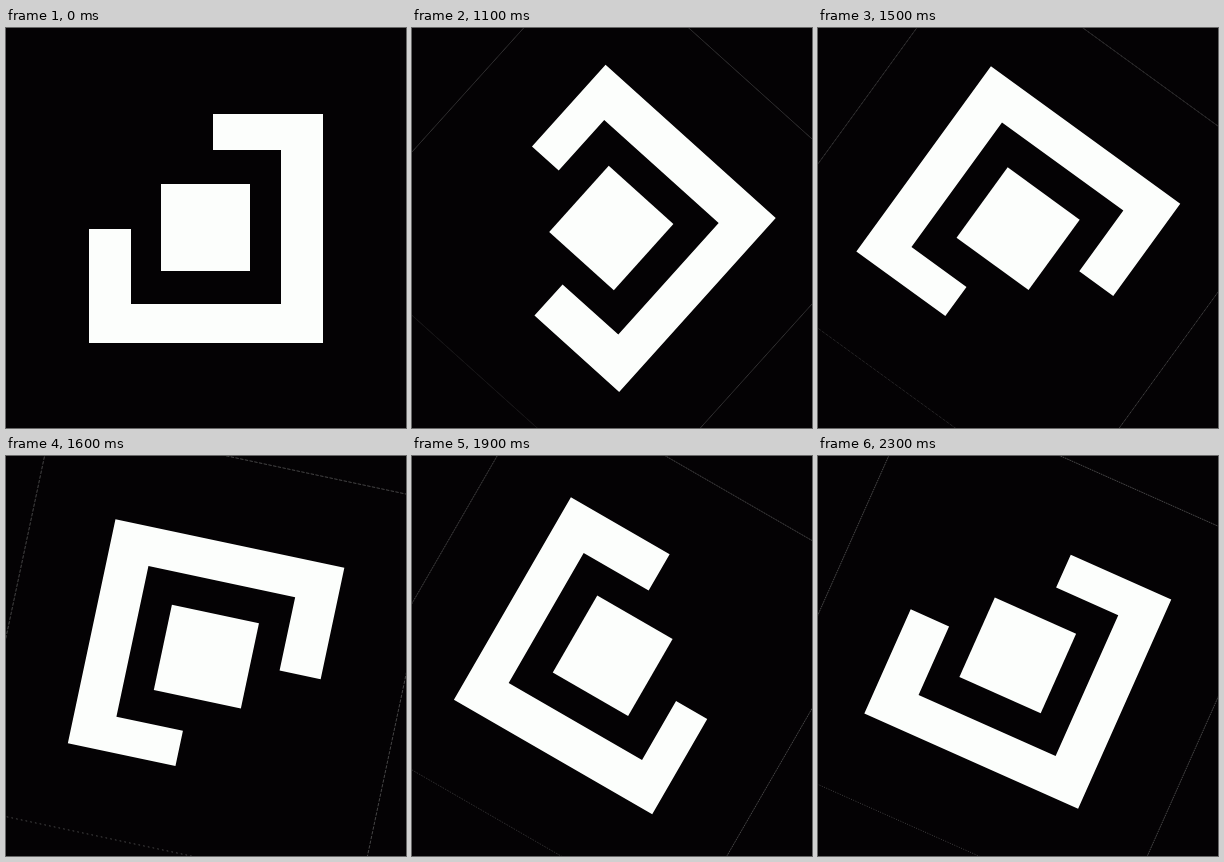
Animation of 400 by 400 pixels, one loop 2.4 s. Source, as an HTML page with a canvas:

```html
<!DOCTYPE html>
<html lang="en">
<head>
<meta charset="utf-8">
<title>Rotating mark</title>
<style>
  html, body { margin: 0; width: 100%; height: 100%; overflow: hidden; background: #040204; }
  canvas { display: block; width: 400px; height: 400px; }
</style>
</head>
<body>
<canvas id="stage" width="400" height="400"></canvas>
<script>
const ctx = document.getElementById('stage').getContext('2d');
const DARK = '#040204', LIGHT = '#fcfefc';
const HOLD = 1000, STEP = 100, STEPS = 15;
const TURN = 360 / STEPS;
const LOOP = HOLD + (STEPS - 1) * STEP;

// Corners of the open bracket, relative to the stage centre
const BRACKET = [
  [7, -114], [117, -114], [117, 115], [-117, 115], [-117, 1],
  [-75, 1], [-75, 76], [75, 76], [75, -78], [7, -78]
];

const rad = deg => deg * Math.PI / 180;

function stepAt(ms) {
  const t = ms % LOOP;
  return t < HOLD ? 0 : 1 + Math.floor((t - HOLD) / STEP);
}

function drawMark(deg) {
  ctx.save();
  ctx.rotate(rad(-deg));
  ctx.fillStyle = LIGHT;
  ctx.beginPath();
  BRACKET.forEach(([x, y]) => ctx.lineTo(x, y));
  ctx.closePath();
  ctx.fill();
  ctx.fillRect(-45, -44, 89, 87);
  ctx.restore();
}

function edge(x1, y1, x2, y2, period, fill, width) {
  ctx.setLineDash([period * fill, period * (1 - fill)]);
  ctx.lineWidth = width;
  ctx.beginPath();
  ctx.moveTo(x1, y1);
  ctx.lineTo(x2, y2);
  ctx.stroke();
}

// Faint broken outline of the turning sheet; its dashes follow the tilt
function drawSheet(deg) {
  const tilt = (deg + 45) % 90 - 45;
  const period = 1 / Math.abs(Math.sin(rad(tilt)));
  ctx.save();
  ctx.rotate(rad(-tilt));
  ctx.strokeStyle = '#686868';
  edge(-200, -200, 200, -200, period, 0.7, 0.6);
  edge(-199.5, -200, -199.5, 200, period, 0.7, 0.6);
  edge(199.5, -200, 199.5, 200, period, 0.7, 0.6);
  edge(-200, 198.7, 200, 198.7, period, 0.35, 0.6);
  ctx.restore();
}

function draw(step) {
  const deg = step * TURN;
  ctx.setTransform(1, 0, 0, 1, 0, 0);
  ctx.fillStyle = DARK;
  ctx.fillRect(0, 0, 400, 400);
  ctx.translate(200, 200);
  if (step) drawSheet(deg);
  drawMark(deg);
}

const start = performance.now();
function tick() {
  draw(stepAt(performance.now() - start));
  requestAnimationFrame(tick);
}
tick();
</script>
</body>
</html>
```
